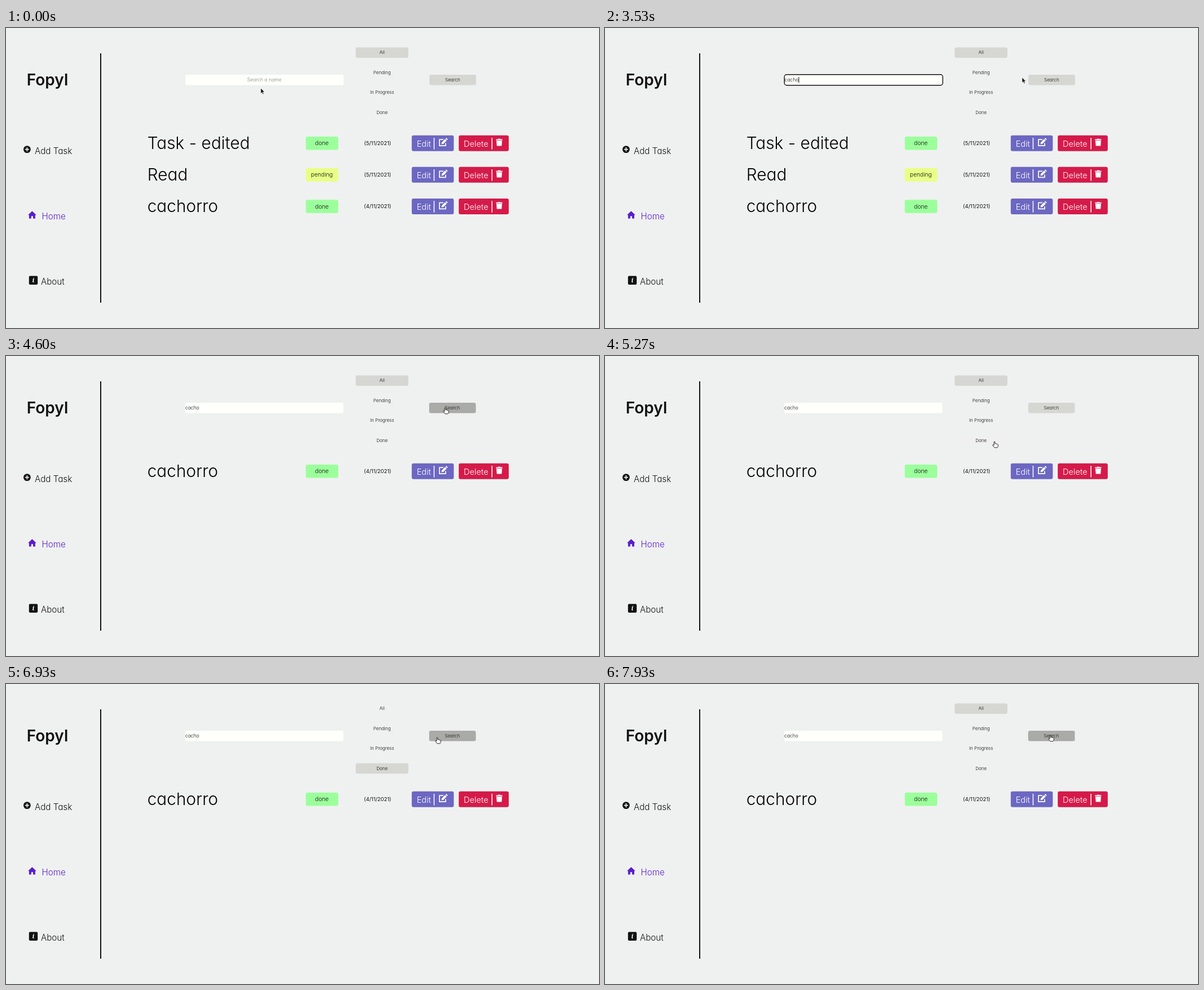
An HTML page that plays this animation: 1052x533 px, repeating every 8 s.

```html
<!DOCTYPE html>
<html lang="en">
<head>
<meta charset="utf-8">
<title>Task list</title>
<style>
  html, body { margin: 0; width: 100%; height: 100%; overflow: hidden; background: #eff1f0; }
  svg { display: block; width: 1052px; height: 533px; }
  text { font-family: Inter, "Open Sans", sans-serif; font-weight: 300; fill: #111; font-feature-settings: "cv11" 1; white-space: pre; }
  .brand { font-size: 28px; font-weight: 600; }
  .menu { font-size: 15.2px; }
  .task { font-size: 29.8px; fill: #000; }
  .badge { font-size: 10.2px; font-weight: 350; }
  .date { font-size: 9.4px; font-weight: 400; }
  .action { font-size: 14.6px; fill: #fff; }
  .small { font-size: 8.1px; font-weight: 350; }
  .field { font-size: 8.6px; font-weight: 350; }
  .mid { text-anchor: middle; }
</style>
</head>
<body>
<svg viewBox="0 0 1052 533" xmlns="http://www.w3.org/2000/svg">
  <defs>
    <g id="pen">
      <path d="M776 198.2H769V209.2H780V204.5" fill="none" stroke="#fff" stroke-width="1.7" stroke-linejoin="round"/>
      <path d="M773 203.2L779 197.2L781.8 200L775.8 206L772.6 206.4ZM779.7 196.5L781.2 195.3L783.7 197.8L782.5 199.3Z" fill="#fff"/>
    </g>
    <path id="bin" fill="#fff" d="M869.3 197.6H872.6L873.2 196.7H876.8L877.4 197.6H880.7V199.3H869.3ZM870 200.1H880L879.3 209.4H870.7Z"/>
  </defs>

  <rect x="167" y="45" width="2" height="443" fill="#111"/>
  <text class="brand mid" x="73.5" y="102">Fopyl</text>

  <circle cx="37.4" cy="215.6" r="6.4" fill="#111"/>
  <path d="M37.4 212V219.2M33.8 215.6H41" stroke="#eff1f0" stroke-width="1.7"/>
  <text class="menu" x="51" y="223.6">Add Task</text>

  <path fill="#5a1fcb" d="M46.4 325.2L53.8 332.2H51.9V338.4H48V334.3H44.8V338.4H40.9V332.2H39Z"/>
  <text class="menu" x="63.5" y="340.2" style="fill:#5a1fcb">Home</text>

  <rect x="40.8" y="440.6" width="15.4" height="15.4" rx="2" fill="#111"/>
  <text x="48.4" y="452.3" class="mid" style="font:italic 700 11px 'Noto Serif',serif;fill:#fff">i</text>
  <text class="menu" x="62" y="456.4">About</text>

  <g id="filters"></g>
  <g id="bar">
    <rect x="318.3" y="83" width="280.6" height="18.5" rx="3" fill="#fffffc"/>
    <text id="hint" class="field mid" x="458.3" y="94.8" style="fill:#858585">Search a name</text>
    <text id="typed" class="field" x="318.4" y="94.8"></text>
    <rect id="caret" y="87" width="1" height="10.5" fill="#111"/>
    <rect id="ring" x="318.2" y="82.8" width="281" height="19" rx="4" fill="none" stroke="#111" stroke-width="1.4"/>
    <rect id="search" x="751.2" y="83" width="82.8" height="18.5" rx="3"/>
    <text class="small mid" x="792.4" y="94.8">Search</text>
  </g>
  <g id="rows"></g>

  <g id="cursor">
    <path id="arrow" d="M0 0V9.2L2.1 7.3L3.6 10.8L5.1 10.1L3.6 6.8H6.6Z" fill="#111" stroke="#fff" stroke-width=".5"/>
    <path id="beam" d="M-2.6 -4.8Q-.2 -4.8 0 -4Q.2 -4.8 2.6 -4.8M0 -4V4.2M-2.6 5Q-.2 5 0 4.2Q.2 5 2.6 5" fill="none" stroke="#333"/>
    <path id="hand" d="M-1 .8C-1 -.3 .9 -.3 .9 .8V4C2 3.3 3 3.6 3 4.3C4 3.8 4.8 4.2 4.8 5C5.8 4.7 6.3 5.2 6.3 6V8C6.3 9.4 5.5 10 5 10.8H0L-3.2 7C-3.9 6 -2.6 5 -1.8 5.9L-1 6.8Z" fill="#fff" stroke="#111" stroke-width=".9" stroke-linejoin="round"/>
  </g>
</svg>
<script>
const $ = id => document.getElementById(id);
const LOOP = 8000;
const FOCUS = 530, TYPE = 1870, LAST_KEY = 3270, BLUR = 4470, RESULT = 4530;
const PICK_DONE = 5800, PICK_ALL = 7600;
const GREY = "#d6d6d3";

const filters = ["All", "Pending", "In Progress", "Done"];
const filterTop = i => 34.6 + i * 35.4;
$("filters").innerHTML = filters.map((name, i) => `
  <rect x="620.4" y="${filterTop(i)}" width="93.4" height="18.5" rx="3"/>
  <text class="small mid" x="667.2" y="${filterTop(i) + 11.8}">${name}</text>`).join("");
const filterBoxes = [...$("filters").querySelectorAll("rect")];

const ROW = 56.1;
const tasks = [
  ["Task - edited", "done", "(5/11/2021)"],
  ["Read", "pending", "(5/11/2021)"],
  ["cachorro", "done", "(4/11/2021)"]
];
const badgeColor = { done: "#9bff9b", pending: "#e8ff87" };

const button = (label, icon, x, width, color) => `
  <rect class="${icon}-box" x="${x}" y="190.7" width="${width}" height="28" rx="3" fill="${color}"/>
  <text class="action" x="${x + 8.9}" y="210.8">${label}</text>
  <rect x="${x + width - 30.3 + (icon === "bin" ? -0.2 : 0) + (icon === "pen" ? -5.4 : 0)}" y="195" width="1.5" height="20.5" fill="#fff"/>
  <use href="#${icon}"/>`;

$("rows").innerHTML = tasks.map(([name, state, date], i) => `
  <g transform="translate(0 ${i * ROW})">
    <text class="task" x="250.7" y="214.5">${name}</text>
    <rect x="531.8" y="193" width="57.6" height="23.6" rx="3" fill="${badgeColor[state]}"/>
    <text class="badge mid" x="560.4" y="208.4">${state}</text>
    <text class="date mid" x="659.2" y="208.2">${date}</text>
    ${button("Edit", "pen", 719.8, 74.6, "#6c67c1")}
    ${button("Delete", "bin", 803.2, 88.7, "#d51a49")}
  </g>`).join("");
const rows = [...$("rows").children];
const lastEdit = rows[2].querySelector(".pen-box");

// Pointer gestures; via bends the curve
const home = [452, 107];
const moves = [
  { from: 70, until: 330, to: [473, 92] },
  { from: 3200, until: 3530, to: [740, 88], via: [620, 66] },
  { from: 3670, until: 4330, to: [779, 92] },
  { from: 4800, until: 5270, to: [691, 152], via: [752, 258] },
  { from: 5270, until: 5600, to: [678, 150] },
  { from: 6000, until: 6930, to: [765, 95] },
  { from: 6930, until: 7400, to: [687, 43], via: [735, 105] },
  { from: 7600, until: 7930, to: [790, 91], via: [705, 90] }
];

const ease = k => k * k * (3 - 2 * k);
const clamp = k => Math.min(1, Math.max(0, k));

function pointAt(t) {
  return moves.reduce((p, { from, until, to, via }) => {
    const k = ease(clamp((t - from) / (until - from)));
    return p.map((a, i) => {
      const c = via ? via[i] : (a + to[i]) / 2;
      return (1 - k) ** 2 * a + 2 * k * (1 - k) * c + k * k * to[i];
    });
  }, home);
}

function typedLength(t) {
  if (t < TYPE) return 0;
  return t < LAST_KEY ? Math.min(4, 1 + Math.floor((t - TYPE) / 130)) : 5;
}

const between = (v, a, b) => v >= a && v < b;
const show = (el, on) => el.setAttribute("visibility", on ? "visible" : "hidden");
const inside = (x, y, l, t, w, h) => between(x, l, l + w) && between(y, t, t + h);

function render(t) {
  // The screen advances fifteen times a second
  const now = Math.round(Math.floor(t * 0.015 + 0.05) * 100 / 15) * 10;
  const [x, y] = pointAt(now);
  const filtered = now >= RESULT;
  const focused = between(now, FOCUS, BLUR);

  const text = "cacho".slice(0, typedLength(now));
  const lastKey = now < LAST_KEY ? TYPE + 400 : LAST_KEY;
  const caretOn = now < lastKey || Math.floor((now - lastKey) / 600) % 2 === 0;
  $("typed").textContent = text;
  show($("hint"), !text);
  show($("ring"), focused);
  show($("caret"), focused && text && caretOn);
  if (text) $("caret").setAttribute("x", 318.4 + $("typed").getComputedTextLength());
  $("bar").setAttribute("transform", `translate(${filtered ? -0.5 : 0} 0)`);

  const overSearch = inside(x, y, 750.7, 83, 83, 18.5);
  $("search").setAttribute("fill", overSearch ? "#aaaaa8" : GREY);

  const selected = between(now, PICK_DONE, PICK_ALL) ? 3 : 0;
  let overFilter = false;
  filterBoxes.forEach((box, i) => {
    const over = inside(x, y, 620.4, filterTop(i), 93.4, 18.5);
    overFilter = overFilter || over;
    box.setAttribute("fill", i === selected ? GREY : over ? "#f0f0f0" : "none");
  });

  show(rows[0], !filtered);
  show(rows[1], !filtered);
  rows[2].setAttribute("transform", `translate(0 ${filtered ? 0 : 2 * ROW})`);

  const overEdit = inside(x, y, 719.8, 190.6, 74.6, 28);
  lastEdit.setAttribute("fill", overEdit ? "#6762b8" : "#6c67c1");

  const overField = inside(x, y, 318, 83, 281, 18.5);
  const hand = overSearch || overFilter || overEdit;
  $("cursor").setAttribute("transform", `translate(${x} ${y})`);
  show($("hand"), hand);
  show($("beam"), overField);
  show($("arrow"), !hand && !overField);
}

const start = performance.now();
function tick() {
  render((performance.now() - start) % LOOP);
  requestAnimationFrame(tick);
}
tick();
</script>
</body>
</html>
```
